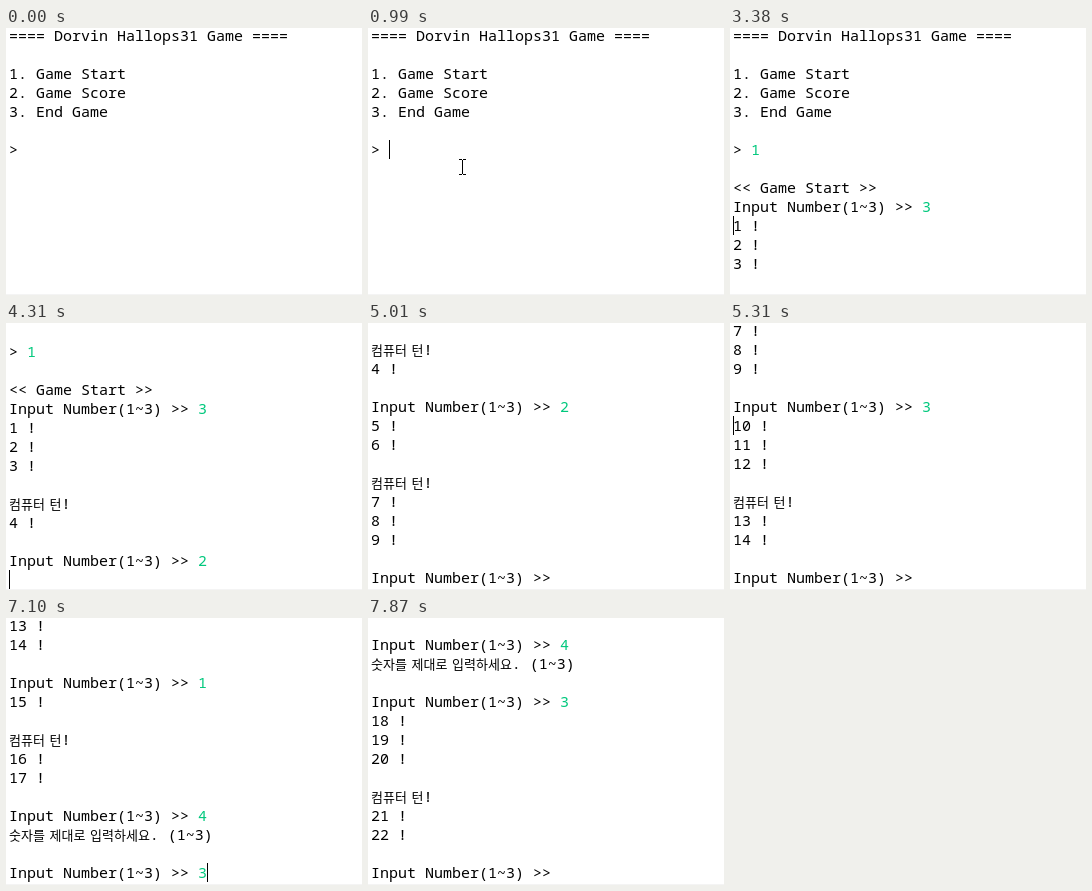
Animation, 356 px wide and 267 px high, one loop 8 s. Source, as an HTML page:

```html
<!DOCTYPE html>
<html lang="ko">
<head>
<meta charset="utf-8">
<title>Console game</title>
<style>
  html, body { margin: 0; width: 100%; height: 100%; overflow: hidden; background: #fff; }
  #stage { position: absolute; inset: 0; overflow: hidden; }
  #text {
    position: absolute; left: 3px; top: -2px; color: #000; white-space: pre;
    font: 15px/19px "Noto Sans Mono", "DejaVu Sans Mono", monospace;
    font-variant-ligatures: none;
  }
  #text div { height: 19px; }
  #text b { font-weight: 400; color: #00c87d; }
  #text span {
    font: 13px/0 "Noto Sans CJK KR", "Noto Sans CJK", "Noto Sans CJK JP", sans-serif;
    word-spacing: 1px;
  }
  #caret { position: absolute; width: 1px; height: 19px; background: #000; }
  #beam { position: absolute; left: 0; top: 0; width: 7px; height: 16px; }
  #edge { position: absolute; left: 0; right: 0; top: 266px; height: 1px; background: #f4f4f4; }
</style>
</head>
<body>
<div id="stage">
  <div id="edge"></div>
  <div id="text"></div>
  <div id="caret"></div>
  <svg id="beam" viewBox="0 0 7 16" shape-rendering="crispEdges">
    <path d="M0 0h3v1h1v-1h3v1h-3v14h3v1h-3v-1h-1v1h-3v-1h3v-14h-3z"/>
  </svg>
</div>
<script>
const LOOP = 8000, ROWS = 14, LINE = 19, CELL = 9;
const ASK = "\nInput Number(1~3) >> ";
const HANGUL = /([가-힣]+(?: [가-힣]+)*)/;
const [text, caretBox, beam] = ["text", "caret", "beam"].map(id => document.getElementById(id));

const lines = [{ out: "", key: "" }];
const snaps = [];
let caret = null;

const last = () => lines[lines.length - 1];

function write(str) {
  str.split("\n").forEach((part, i) => {
    if (i) lines.push({ out: "", key: "" });
    last().out += part;
  });
}

function type(key) {
  last().key = key;
  caret = { row: lines.length - 1, col: last().out.length + key.length };
}

function enter() {
  write("\n");
  caret = { row: lines.length - 1, col: 0 };
}

function count(from, to) {
  for (let n = from; n <= to; n++) write(n + " !\n");
}

function reply(from, to) {
  write("\n컴퓨터 턴!\n");
  count(from, to);
  write(ASK);
}

const hide = () => { caret = null; };

function at(time, step, shift = 0) {
  step();
  const top = Math.max(0, lines.length - ROWS);
  snaps.push({
    time, shift,
    lines: lines.slice(top).map(l => ({ ...l })),
    caret: caret && { row: caret.row - top, col: caret.col }
  });
}

at(0, () => write("==== Dorvin Hallops31 Game ====\n\n1. Game Start\n2. Game Score\n3. End Game\n\n> "));
at(990, () => type(""));
at(1500, hide);
at(2050, () => type("1"));
at(2220, enter);
at(2290, () => write("\n<< Game Start >>" + ASK));
at(2840, hide);
at(3070, () => type("3"));
at(3300, enter);
at(3380, () => count(1, 3));
at(3530, () => reply(4, 4));
at(4000, hide);
at(4080, () => type("2"));
at(4310, enter, 2);
at(4380, () => count(5, 6));
at(4460, () => reply(7, 9));
at(5010, hide);
at(5085, () => type("3"));
at(5160, () => { enter(); count(10, 12); });
at(5310, () => reply(13, 14));
at(5710, () => type("1"));
at(5860, enter, 2);
at(5935, () => count(15, 15));
at(6010, () => reply(16, 17));
at(6410, () => type("4"));
at(6560, enter, 2);
at(6640, () => write("숫자를 제대로 입력하세요. (1~3)\n" + ASK));
at(7100, () => type("3"));
at(7180, enter, 2);
at(7260, () => count(18, 20));
at(7410, () => reply(21, 22));
at(7870, hide);

function element(tag, content) {
  const el = document.createElement(tag);
  el.textContent = content;
  return el;
}

function lineBox({ out, key }) {
  const row = document.createElement("div");
  for (const part of out.split(HANGUL)) {
    if (part) row.append(HANGUL.test(part) ? element("span", part) : part);
  }
  if (key) row.append(element("b", key));
  return row;
}

function show(snap) {
  text.replaceChildren(...snap.lines.map(lineBox));
  text.style.top = snap.shift - 2 + "px";
  caretBox.hidden = !snap.caret;
  if (snap.caret) {
    caretBox.style.left = 3 + snap.caret.col * CELL + "px";
    caretBox.style.top = snap.shift - 2 + snap.caret.row * LINE + "px";
  }
}

// The pointer glides in from the bottom edge, nudges on the click, hides on typing.
function movePointer(t) {
  beam.style.display = t >= 70 && t < 2050 ? "block" : "none";
  const k = Math.min(1, Math.floor((t - 70) / 75) / 8);
  const ease = 1 - (1 - k) ** 2;
  const nudge = t >= 990 && t < 1140 ? (t < 1065 ? 1 : 0.5) : 0;
  const x = Math.round(240 - 155 * ease + 6 * nudge);
  const y = Math.round(258 - 130 * ease + 3 * nudge);
  beam.style.transform = `translate(${x}px, ${y}px)`;
}

let shown = null;
function draw() {
  const t = performance.now() % LOOP;
  const snap = snaps.filter(s => s.time <= t).pop();
  if (snap !== shown) show(shown = snap);
  movePointer(t);
  requestAnimationFrame(draw);
}
draw();
</script>
</body>
</html>
```
